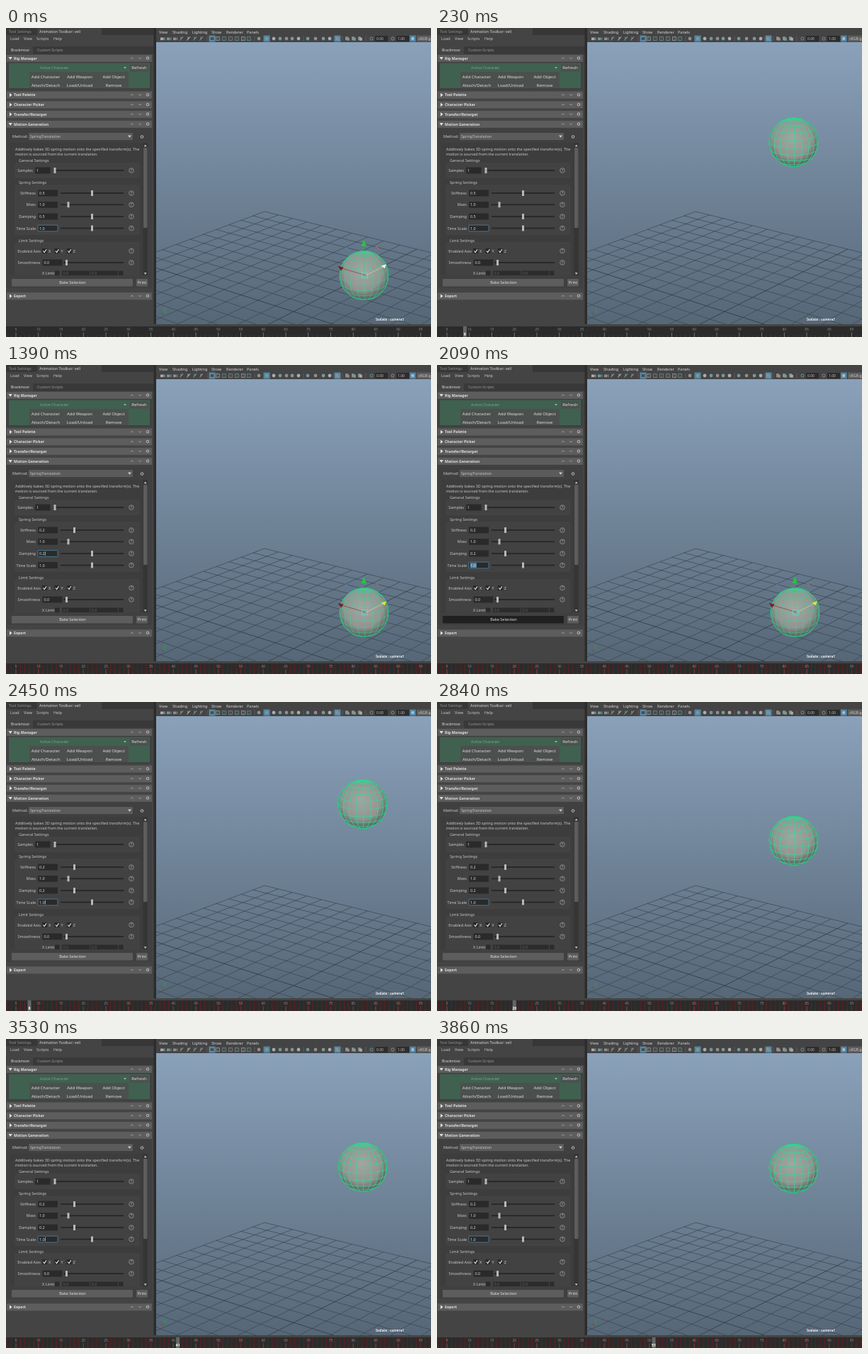
Write an HTML page that moves like this. It is 600 by 436 pixels and loops after 3.89 s.

```html
<!DOCTYPE html>
<html lang="en">
<head>
<meta charset="utf-8">
<title>Spring motion tool</title>
<style>
html, body { margin: 0; width: 100%; height: 100%; overflow: hidden; background: #444; }
svg { display: block; width: 600px; height: 436px; }
text { font-family: "Noto Sans", "Open Sans", sans-serif; white-space: pre; }
</style>
</head>
<body>
<svg id="stage" viewBox="0 0 600 436" xmlns="http://www.w3.org/2000/svg">
  <defs>
    <linearGradient id="sky" x1="0" y1="0" x2="0" y2="1">
      <stop offset="0" stop-color="#8aa1ba"/><stop offset="1" stop-color="#566777"/>
    </linearGradient>
    <radialGradient id="clay" cx=".48" cy=".42" r=".6">
      <stop offset="0" stop-color="#a5a5a3"/><stop offset=".65" stop-color="#929492"/><stop offset="1" stop-color="#4f5955"/>
    </radialGradient>
    <clipPath id="view"><rect x="212" y="20" width="388" height="398"/></clipPath>
    <clipPath id="scroll"><rect x="4" y="160" width="200" height="189"/></clipPath>
  </defs>
</svg>
<script>
const LOOP = 3890;
const stage = document.getElementById("stage");

function el(tag, attrs, parent = stage) {
  const node = document.createElementNS("http://www.w3.org/2000/svg", tag);
  for (const k in attrs) node.setAttribute(k, attrs[k]);
  return parent.appendChild(node);
}
const group = (attrs = {}, parent) => el("g", attrs, parent);
const rect = (x, y, width, height, fill, parent, more) => el("rect", { x, y, width, height, fill, ...more }, parent);
const path = (d, stroke, parent, more) => el("path", { d, stroke, fill: "none", "stroke-width": 0.8, ...more }, parent);
function text(x, y, str, parent, { size = 5.5, fill = "#c8c8c8", weight = 400, anchor = "start" } = {}) {
  const node = el("text", { x, y, fill, "font-size": size, "font-weight": weight, "text-anchor": anchor }, parent);
  node.textContent = str;
  return node;
}
const show = (node, on) => node.setAttribute("display", on ? "inline" : "none");

// ---------- tool panel ----------
function gear(x, y) {
  el("circle", { cx: x, cy: y, r: 1.7, fill: "none", stroke: "#c8c8c8", "stroke-width": 1.1, "stroke-dasharray": "1.1 .35" });
}

function header(y, title, open) {
  rect(1, y - 5, 205, 10, "#5d5d5d");
  el("path", { d: open ? `M3.5 ${y - 1.8}h5.4l-2.7 3.8z` : `M5 ${y - 2.7}v5.4l3.6 -2.7z`, fill: "#e0e0e0" });
  text(11, y + 1.8, title, stage, { weight: 700, fill: "#e0e0e0", size: 5.2 });
  path(`M176 ${y + 0.8}l2 -2l2 2M187 ${y - 1.2}l2 2l2 -2`, "#b0b0b0");
  gear(200, y - 0.3);
}

function help(y, parent) {
  el("circle", { cx: 177, cy: y, r: 3.3, fill: "none", stroke: "#a8a8a8", "stroke-width": 0.7 }, parent);
  text(177, y + 1.9, "?", parent, { size: 5, anchor: "middle" });
}

function slider(y, label, value, box, track, knob, parent) {
  text(box - 3, y + 2, label, parent, { anchor: "end" });
  const width = box === 41 ? 21.5 : 28;
  const frame = rect(box, y - 4.4, width, 8.8, "#2a2a2a", parent, { rx: 0.7, "stroke-width": 0.8 });
  const mark = rect(box + 2, y - 3.3, 9, 6.8, "#5285a6", parent);
  const field = text(box + 2, y + 2, value, parent, { fill: "#d8d8d8" });
  const caret = rect(box + 10.8, y - 3, 0.6, 6, "#f0f0f0", parent);
  rect(track, y - 0.8, 166 - track, 1.6, "#242424", parent);
  const thumb = rect(knob - 1.5, y - 4, 3, 8, "#b8b8b8", parent, { rx: 0.5 });
  help(y, parent);
  show(mark, false);
  show(caret, false);
  return {
    set(val, pos, focus, selected, blink) {
      field.textContent = val;
      thumb.setAttribute("x", pos - 1.5);
      frame.setAttribute("stroke", focus ? "#5285a6" : "none");
      show(mark, selected);
      show(caret, blink);
      caret.setAttribute("x", box + 0.8 + 3.05 * val.length);
    }
  };
}

rect(0, 0, 600, 436, "#444");
rect(0, 0, 209, 10, "#373737");
rect(44, 0, 91, 10, "#444");
text(4, 6.8, "Tool Settings", stage, { fill: "#929292", size: 5.3 });
text(47, 6.8, "Animation Toolbar: vell", stage, { fill: "#d8d8d8", size: 5.4 });
["Load", "View", "Scripts", "Help"].forEach((s, i) => text([6, 25, 43, 67][i], 16.8, s));
rect(0, 26, 209, 11, "#393939");
rect(1, 26, 37, 11, "#444");
text(7, 33, "Brackmoor", stage, { size: 5.1, fill: "#dedede" });
text(44, 33, "Custom Scripts", stage, { size: 5.2, fill: "#999" });

header(42.8, "Rig Manager", true);
rect(1, 48, 205, 39, "#404040");
rect(4, 49.5, 199, 35.5, "#406050");
rect(33, 62, 140, 23, "#4b504e");
text(48, 58, "Active Character", stage, { fill: "#7fa48f", size: 5.3 });
el("path", { d: "M166 55h4l-2 2.4z", fill: "#a0b3a8" });
rect(175, 51, 26, 10.5, "#4b504e");
text(188, 58.4, "Refresh", stage, { anchor: "middle", size: 6, fill: "#ddd" });
["Add Character", "Add Weapon", "Add Object", "Attach/Detach", "Load/Unload", "Remove"].forEach((s, i) =>
  text([56, 104, 152][i % 3], i < 3 ? 70.6 : 82.5, s, stage, { anchor: "middle", size: 6, fill: "#ddd" }));
header(94.5, "Tool Palette");
header(108.3, "Character Picker");
header(121.8, "Transfer/Retarget");
header(135.8, "Motion Generation", true);

rect(1, 141, 205, 226, "#404040");
text(9, 155, "Method:");
rect(32, 148, 147, 10, "#5b5b5b", stage, { rx: 1 });
text(34, 155, "SpringTranslation", stage, { size: 5.2 });
el("path", { d: "M172 151.5h5l-2.5 3.2z", fill: "#ccc" });
gear(192, 153.5);

const form = group({ "clip-path": "url(#scroll)" });
rect(5, 162, 195, 188, "#3d3d3d", form);
text(13, 173, "Additively bakes 3D spring motion onto the specified transform(s). The", form, { size: 5.3 });
text(13, 180, "motion is sourced from the current translation.", form, { size: 5.3 });
[[191, 20], [222, 69], [303, 60]].forEach(([y, h]) =>
  rect(13, y, 175, h, "#424242", form, { stroke: "#494949", "stroke-width": 0.7, rx: 1.5 }));
text(18, 189, "General Settings", form);
text(18, 220.3, "Spring Settings", form);
text(18, 302, "Limit Settings", form);
slider(201, "Samples", "1", 41, 67, 69, form).set("1", 69, false, false, false);
const stiff = slider(233, "Stiffness", "0.5", 45, 77, 121.5, form);
slider(249.3, "Mass", "1.0", 45, 77, 88, form);
const damp = slider(266, "Damping", "0.5", 45, 77, 121.5, form);
const scale = slider(282.5, "Time Scale", "1.0", 45, 77, 121.5, form);
slider(331, "Smoothness", "0.0", 51.5, 81, 85.5, form);
text(49, 316.5, "Enabled Axis", form, { anchor: "end" });
["X", "Y", "Z"].forEach((s, i) => {
  const x = 51 + i * 17.4;
  rect(x, 311, 7, 7, "#292929", form);
  path(`M${x + 1.4} 314.5l1.8 2l2.8 -4.3`, "#eee", form, { "stroke-width": 1.1 });
  text(x + 9, 316.5, s, form);
});
help(314.5, form);
text(51, 348.4, "X Limit", form);
[[69, 6.5], [79, 39], [119, 39], [159, 6.5]].forEach(([x, w]) => rect(x, 342.5, w, 8, "#2c2c2c", form));
text(80.5, 348.4, "0.0", form, { fill: "#606060" });
text(120.5, 348.4, "0.0", form, { fill: "#606060" });
rect(193.5, 162, 6.5, 188, "#353535", form);
rect(194, 169, 5.5, 113, "#5d5d5d", form, { rx: 1 });
el("path", { d: "M194.7 167.3h4l-2 -2.8zM194.7 345.2h4l-2 2.8z", fill: "#c5c5c5" }, form);

const bake = rect(8, 354, 171, 10.5, "#5d5d5d", stage, { rx: 1 });
text(94, 361.2, "Bake Selection", stage, { anchor: "middle", fill: "#e2e2e2" });
rect(184, 354, 16, 10.5, "#5d5d5d", stage, { rx: 1 });
text(192, 361.2, "Print", stage, { anchor: "middle", fill: "#e2e2e2" });
header(378.3, "Export");

// ---------- viewport bar ----------
rect(208.5, 0, 3.5, 420, "#2d2d2d");
rect(212, 0, 388, 20, "#444");
["View", "Shading", "Lighting", "Show", "Renderer", "Panels"].forEach((s, i) =>
  text([216, 235, 263, 290, 311, 340][i], 8, s, stage, { fill: "#d5d5d5" }));

const tints = ["#a8adae", "#6d97a3", "#8f8f8f", "#7b9a96"];
[291, 368, 468].forEach(x => rect(x - 4.5, 10.5, 9, 9, "#5285a6"));
[221, 230, 239, 248, 258, 267, 276, 291, 299, 308, 317, 326, 335, 343, 357, 368, 378, 387,
 396, 404, 413, 426, 437, 448, 457, 468, 482, 491, 500, 516, 546].forEach((x, i) => {
  const c = tints[i % 4];
  if (i < 3) { rect(x - 3, 13.5, 4, 3.6, c); path(`M${x + 1} 15l2 -1.4v3.4l-2 -1.4`, c); }
  else if (i < 7) path(`M${x - 2.5} 17.5l4.5 -5.2M${x - 1} 12.5v3`, c, stage, { "stroke-width": 1.1 });
  else if (i < 14) { rect(x - 2.6, 12.7, 5.2, 4.6, "#3a3f42", stage, { stroke: c, "stroke-width": 0.7 }); path(`M${x} 13v4`, c, stage, { "stroke-width": 0.5 }); }
  else if (i < 25) el("circle", { cx: x, cy: 15, r: 2.4, fill: c });
  else if (i < 29) { rect(x - 3, 12.2, 4, 5, "#8b8f90"); rect(x - 0.8, 13.7, 3.6, 4, c); }
  else el("circle", { cx: x, cy: 15, r: 2.1, fill: "none", stroke: c, "stroke-width": 0.9 });
});
[284, 351, 420, 462, 475, 508].forEach(x => path(`M${x} 11.5v7`, "#606060"));
rect(521, 11, 18, 8, "#2c2c2c");
text(523, 17, "0.00", stage, { size: 5 });
rect(551, 11, 18, 8, "#2c2c2c");
text(553, 17, "1.00", stage, { size: 5 });
rect(570, 10.5, 8.5, 9, "#5285a6");
el("circle", { cx: 574.2, cy: 15, r: 2.2, fill: "#a5c0c9" });
rect(580, 10.5, 20, 9, "#5d5d5d");
text(582, 17.2, "sRGB ga", stage, { size: 5.2 });

// ---------- viewport ----------
rect(212, 20, 388, 398, "url(#sky)");
const view = group({ "clip-path": "url(#view)" });

// Ground plane from its far corner and two vanishing points.
const far = [365, 259], vanU = [-1461, -192], vanV = [1575, -192];
function ground(u, v) {
  const a = -0.01053 * u, b = -0.01331 * v;
  return [0, 1].map(i => ((far[i] + a * vanU[i] + b * vanV[i]) / (1 + a + b)).toFixed(2)).join(" ");
}
for (let i = 0; i <= 20; i++) {
  path(`M${ground(i, 0)}L${ground(i, 20)}M${ground(0, i)}L${ground(20, i)}`,
    i === 10 ? "#2a323a" : "#3a454f", view, { "stroke-width": 0.7 });
}
path("M224 404V396", "#2f9a50", view, { "stroke-width": 0.9 });
el("path", { d: "M222.8 398h2.4l-1.2 -3z", fill: "#2f9a50" }, view);
path("M224 404l5 -1.5", "#3d7f62", view);
path("M224 404l-5 -1.5", "#8a4038", view);
text(522, 413.4, "Isolate : camera1", view, { size: 4.7, fill: "#f2f2f2", weight: 600 });

const R = 34.5;
const ball = group({}, view);
el("circle", { r: R, fill: "url(#clay)" }, ball);
const wire = path("", "#30dc96", ball);
el("circle", { r: R, fill: "none", stroke: "#24cf86", "stroke-width": 0.9 }, ball);

const manip = group({}, view);
path("M505 349V306", "#3fd04a", manip, { "stroke-width": 0.7, opacity: 0.45 });
path("M508 349l-34 -10", "#8a3a34", manip, { "stroke-width": 0.7 });
path("M508 349l24 -12", "#d8d49a", manip, { "stroke-width": 0.7 });
rect(502.5, 345.5, 8, 7, "none", manip, { stroke: "#58dcd2", "stroke-width": 0.8 });
el("path", { d: "M501.5 308l3.7 -9.5l3.7 9.5z", fill: "#25c53c" }, manip);
el("path", { d: "M468.5 336l8 1.5l-3.5 5.2z", fill: "#74241f" }, manip);
const tip = el("path", { d: "M529.5 335.5l7.5 -2.2l-2.3 6z" }, manip);
path("M479 309l6 5", "#527fb5", manip, { "stroke-width": 1.6 });
path("M522 308l5 4", "#a5714f", manip, { "stroke-width": 1.6 });

// Front half of a 20 x 20 sphere seen at the given pitch.
function sphere(pitch) {
  const s = Math.sin(pitch), c = Math.cos(pitch), step = Math.PI / 10;
  let d = "";
  const line = (n, at) => {
    let pen = false;
    for (let i = 0; i <= n; i++) {
      const [lat, lon] = at(i / n);
      const x = Math.cos(lat) * Math.sin(lon), z = Math.cos(lat) * Math.cos(lon), y = Math.sin(lat);
      if (y * s + z * c < 0) { pen = false; continue; }
      d += (pen ? "L" : "M") + (R * x).toFixed(1) + " " + (R * (z * s - y * c)).toFixed(1);
      pen = true;
    }
  };
  for (let k = -4; k <= 4; k++) line(48, p => [k * step, (p * 2 - 1) * Math.PI]);
  for (let k = 0; k < 20; k++) line(20, p => [(p - 0.5) * Math.PI, k * step + 0.04]);
  return d;
}

// ---------- time slider ----------
const frameX = n => 14 + (n - 5) * 6.35;
rect(0, 418, 600, 3, "#444");
rect(0, 421, 600, 15, "#2b2b2b");
const ticks = group();
const keys = group();
for (let n = 3; n < 98; n++) {
  const x = frameX(n), major = n % 5 === 0;
  rect(x - 0.4, major ? 429.5 : 433.5, 0.8, 7, major ? "#858585" : "#484848", ticks);
  rect(x - 0.4, 421.5, 0.8, 14.5, "#701c1d", keys);
}
for (let n = 5; n < 98; n += 5) text(frameX(n), 427.3, n, stage, { size: 5, anchor: "middle", fill: "#858585" });
const head = group();
rect(-2.5, 421, 5, 15, "#666", head);
const count = text(0, 434, "", head, { size: 5.4, anchor: "middle", fill: "#fff", weight: 600 });

// ---------- motion ----------
const REST = 349, TOP = 183, RAMP = 5, RATE = 0.03048;

function step(t, k, c) {
  if (t <= 0) return 0;
  const w = Math.sqrt(k - c * c / 4);
  return 1 - Math.exp(-c * t / 2) * (Math.cos(w * t) + c / (2 * w) * Math.sin(w * t));
}
// Spring answer to a short linear lift.
function height(n, k) {
  let sum = 0;
  for (let i = 0; i < 16; i++) sum += step(n - RAMP * (i + 0.5) / 16, k, k);
  return REST + (TOP - REST) * sum / 16;
}

const plays = [
  { from: 50, to: 1050, time: 640, frame: 21, k: 0.5 },
  { from: 2190, to: LOOP, time: 2450, frame: 8, k: 0.2 }
];
// time, focused field, stiffness, damping, selected
const edits = [
  [0, "scale", "0.5", "0.5", false],
  [1110, "stiff", "0.5", "0.5", true],
  [1180, "stiff", "0.", "0.5", false],
  [1230, "stiff", "0.2", "0.5", false],
  [1290, "damp", "0.2", "0.5", true],
  [1340, "damp", "0.2", "0.", false],
  [1380, "damp", "0.2", "0.2", false],
  [1560, "scale", "0.2", "0.2", true],
  [2190, "scale", "0.2", "0.2", false]
];

function draw(t) {
  const play = plays.find(p => t >= p.from && t < p.to);
  let y = REST;
  if (play) {
    const n = Math.max(0, Math.round(play.frame + (t - play.time) * RATE));
    y = height(n, play.k);
    head.setAttribute("transform", `translate(${frameX(n)} 0)`);
    count.textContent = n;
  }
  show(head, play);
  show(manip, !play);
  show(keys, t >= 1050);
  tip.setAttribute("fill", t < 1050 ? "#f0f0e8" : "#e8e03c");
  ball.setAttribute("transform", `translate(${play ? 503.5 : 505.5} ${y.toFixed(2)})`);
  wire.setAttribute("d", sphere(Math.atan((y + 192) / 1420)));
  wire.setAttribute("opacity", play ? 0.95 : 0.6);

  const [, focus, k, c, selected] = edits.filter(e => t >= e[0]).pop();
  const start = t < 1110 ? -530 : t < 2190 ? 1110 : 2190;
  const blink = focus !== "scale" || Math.floor((t - start) / 530) % 2 === 0;
  const on = name => [focus === name, focus === name && selected, focus === name && !selected && blink && t >= 530];
  stiff.set(k, t < 1290 ? 121.5 : 96.5, ...on("stiff"));
  damp.set(c, t < 1560 ? 121.5 : 96.5, ...on("damp"));
  scale.set("1.0", 121.5, ...on("scale"));
  bake.setAttribute("fill", t >= 2050 && t < 2150 ? "#202020" : "#5d5d5d");
}

const began = performance.now();
function tick() {
  draw((performance.now() - began) % LOOP);
  requestAnimationFrame(tick);
}
draw(0);
requestAnimationFrame(tick);
</script>
</body>
</html>
```
